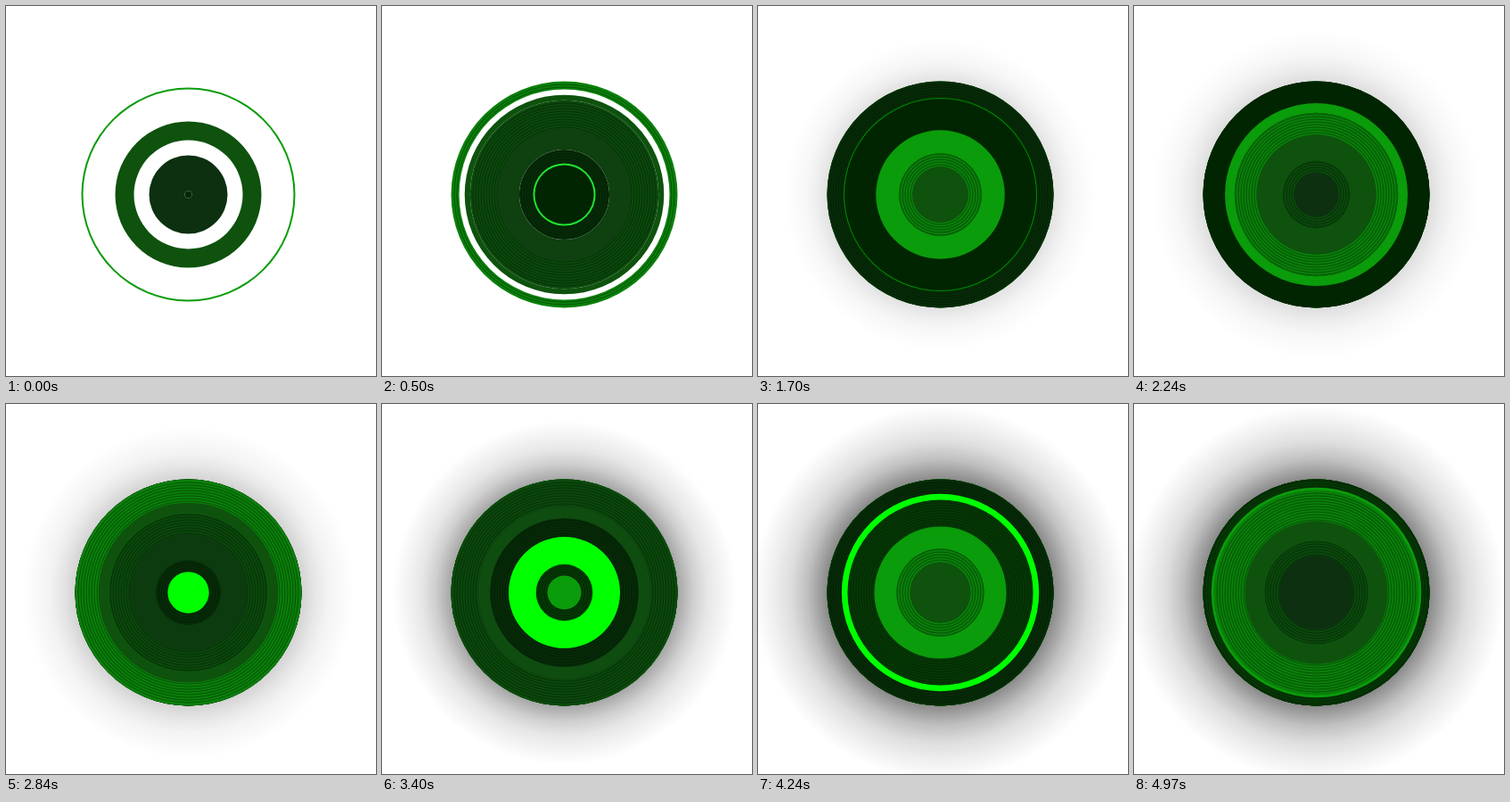
Animation of 415 by 415 pixels, one loop 5 s. Source, as an HTML page with a canvas:

```html
<!DOCTYPE html>
<html lang="en">
<head>
<meta charset="utf-8">
<title>Green ripples</title>
<style>
  html, body { margin: 0; width: 100%; height: 100%; overflow: hidden; background: #fff; }
  canvas { display: block; width: 415px; height: 415px; }
</style>
</head>
<body>
<canvas id="stage" width="415" height="415"></canvas>
<script>
const ctx = document.getElementById('stage').getContext('2d');
const LOOP = 5, STEPS = 150, GAP = 0.625;
const CX = 204.5, CY = 211.5, EDGE = 127;

// Pairs of [time, value], joined by straight lines
const GROWTH = [[0, 0], [0.275, 19], [0.625, 44], [0.9, 62.5], [1.25, 82], [1.525, 97], [1.875, 120], [1.985, EDGE]];
const GLOW_ALPHA = [[0.55, 0], [0.97, 0.02], [1.6, 0.11], [2.14, 0.13], [2.7, 0.13], [3.4, 0.35], [3.75, 0.42], [4.27, 0.46]];
const GLOW_WIDTH = [[0.55, 10], [0.97, 18], [1.6, 46], [2.14, 58], [2.7, 58], [3.4, 66], [3.75, 76], [4.27, 84]];
const GLOW_FALL = [[0, 1], [0.27, 0.54], [0.5, 0.28], [0.75, 0.13], [1, 0]];

const BRIGHT = { fill: '#00ff00', trail: '#052d05', band: 'rgba(0,90,0,.4)' };
const GREEN = { fill: '#0a9c0a', trail: '#0a800a', band: 'rgba(0,40,0,.5)' };
const MID = { fill: '#0e520e', trail: '#0b480c', band: 'rgba(0,24,0,.45)' };
const DARK = { fill: '#0c3010', trail: '#062b07', band: 'rgba(0,16,0,.35)' };
const OUTLINED = { fill: '#002500', trail: '#002500', rim: true };
const CYCLE = [BRIGHT, GREEN, MID, DARK];

function along(points, x) {
  if (x <= points[0][0]) return points[0][1];
  for (let i = 1; i < points.length; i++) {
    const [x0, y0] = points[i - 1], [x1, y1] = points[i];
    if (x < x1) return y0 + (y1 - y0) * (x - x0) / (x1 - x0);
  }
  return points[points.length - 1][1];
}

const outerAt = age => along(GROWTH, age);
const innerAt = r => Math.min(r, Math.max(0, 1.5 * r - 62));

function annulus(inner, outer, color) {
  if (outer <= inner) return;
  ctx.beginPath();
  ctx.arc(CX, CY, outer, 0, 2 * Math.PI);
  if (inner > 0) ctx.arc(CX, CY, inner, 0, 2 * Math.PI, true);
  ctx.fillStyle = color;
  ctx.fill();
}

function glow(t) {
  const alpha = along(GLOW_ALPHA, t), reach = EDGE + along(GLOW_WIDTH, t);
  const g = ctx.createRadialGradient(CX, CY, EDGE, CX, CY, reach);
  for (const [at, k] of GLOW_FALL) g.addColorStop(at, `rgba(0,0,0,${alpha * k})`);
  annulus(EDGE - 1, reach, g);
}

function darkFill(r) {
  const k = Math.min(1, Math.max(0, (r - 44) / 53));
  return `rgb(${12 + 3 * k},${48 + 28 * k},16)`;
}

function ring(k, t) {
  const style = k === 0 ? OUTLINED : CYCLE[(k + 4) % 4];
  const outer = outerAt(t - k * GAP), inner = innerAt(outer);
  // Rings already under way at the start leave no trail before it
  const from = k < -1 ? innerAt(outerAt(-k * GAP)) : 0;

  annulus(from, inner, style.trail);
  if (style.band) {
    for (let r = Math.ceil(from / 3) * 3; r + 1 < inner; r += 3) annulus(r, r + 1, style.band);
  }
  annulus(inner, outer, style === DARK ? darkFill(outer) : style.fill);
  if (style.rim && outer > 2 && outer < EDGE) {
    const fade = Math.min(1, Math.max(0, (outer - 66) / 43));
    annulus(outer - 2 + fade, outer, `rgb(${32 * (1 - fade)},${228 - 88 * fade},${48 * (1 - fade)})`);
  }
}

function draw(t) {
  ctx.fillStyle = '#fff';
  ctx.fillRect(0, 0, 415, 415);
  glow(t);
  for (let k = -3; k * GAP <= t; k++) ring(k, t);
}

const start = performance.now();
function tick() {
  const time = (performance.now() - start) / 1000 % LOOP;
  draw(Math.floor(time * STEPS / LOOP) * LOOP / STEPS);
  requestAnimationFrame(tick);
}
tick();
</script>
</body>
</html>
```
